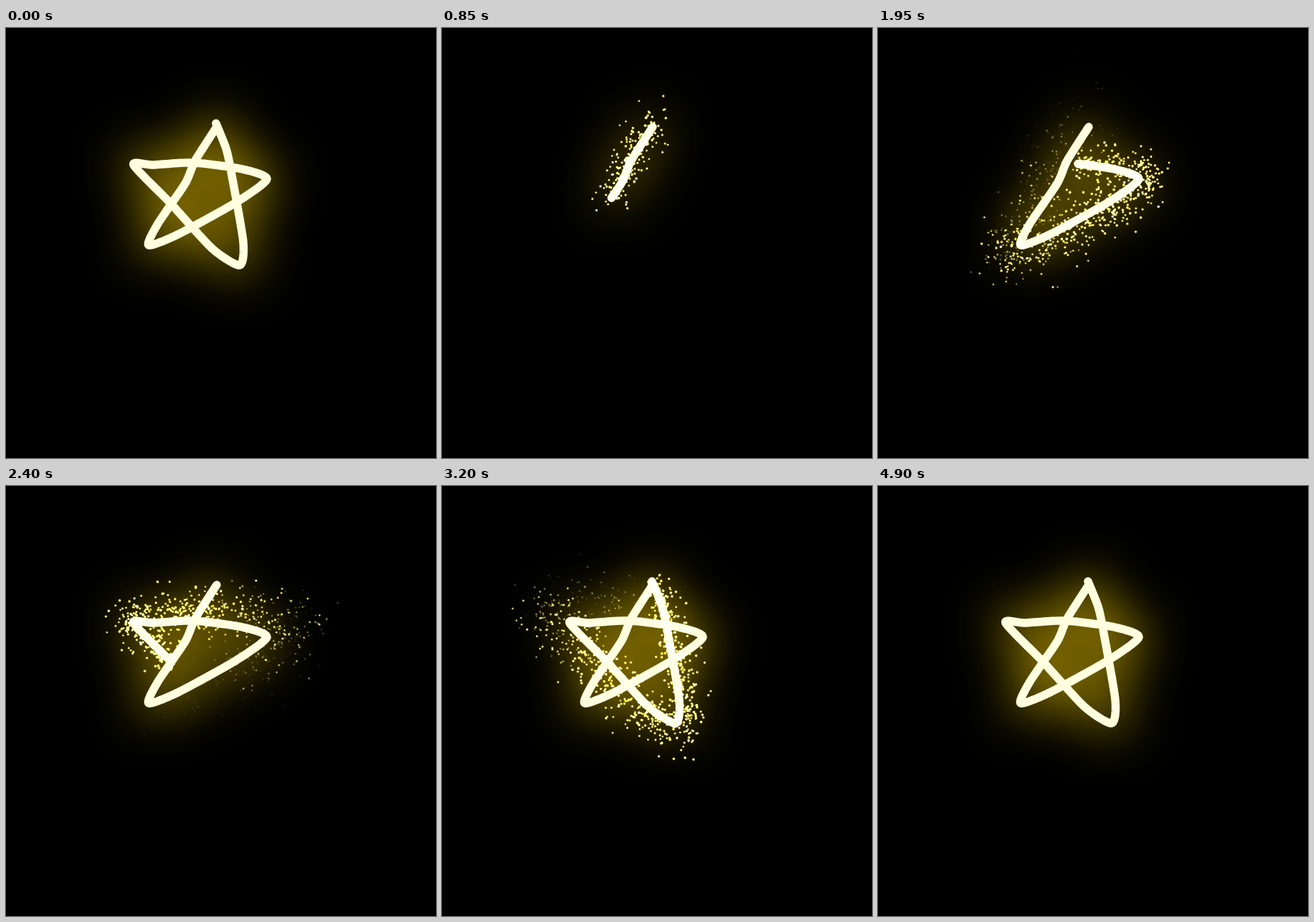
These frames come from a looping animation (600x600 px, 5150 ms). An HTML page with a canvas:

```html
<!DOCTYPE html>
<html lang="en">
<head>
<meta charset="utf-8">
<title>Sparkling star</title>
<style>
  html, body { margin: 0; width: 100%; height: 100%; overflow: hidden; background: #000; }
  canvas { display: block; width: 100vw; height: 100vh; }
</style>
</head>
<body>
<canvas id="stage" width="600" height="600"></canvas>
<script>
const ctx = document.getElementById('stage').getContext('2d');
const SIZE = 600, LOOP = 5150, TICK = 50, SPARKS = 1900;
const CENTER = { x: 270, y: 235 };

// Corners and main bends of the hand-drawn star
const bends = [
  [294,138],[264,185],[250,217],[212,273],[199,303],[240,288],[320,244],[364,211],[330,197],[262,188],
  [205,191],[178,191],[230,245],[288,308],[326,331],[331,298],[314,200],[307,168],[293,133]
];

// The picture moves one step per tick within these spans (ms)
const spans = [
  [400,500],[750,850],[1050,1500],[1600,1700],[1950,2450],[2500,2550],
  [2750,2950],[3200,3250],[3450,3950],[4000,4200],[4400,4450],[4750,4900]
];

// Smooth curve through the bends, each point with its distance along the line
function makeLine() {
  const tension = 0.35, detail = 16, last = bends.length - 1, line = [];
  const slope = (i, k) =>
    tension * (bends[Math.min(i + 1, last)][k] - bends[Math.max(i - 1, 0)][k]);
  let prev = null;
  for (let n = 0; n <= last * detail; n++) {
    const i = Math.min(Math.floor(n / detail), last - 1), t = n / detail - i;
    const ease = t * t * (3 - 2 * t);
    const [x, y] = [0, 1].map(k =>
      bends[i][k] + (bends[i + 1][k] - bends[i][k]) * ease +
      slope(i, k) * t * (1 - t) ** 2 - slope(i + 1, k) * t * t * (1 - t));
    const d = prev ? prev.d + Math.hypot(x - prev.x, y - prev.y) : 0;
    line.push(prev = { x, y, d });
  }
  return line;
}
const line = makeLine();
const LENGTH = line[line.length - 1].d;

// Pen keys: step, distance drawn
const pen = [[0, 0], [3, 22], [13, 332], [29, 652], [38, LENGTH]];

function interpolate(keys, v, from, to) {
  const i = Math.max(1, keys.findIndex(key => key[from] >= v));
  const a = keys[i - 1], b = keys[i];
  return a[to] + (b[to] - a[to]) * (v - a[from]) / (b[from] - a[from]);
}
const drawnAt = step => step >= 38 ? LENGTH : interpolate(pen, step, 0, 1);
const birthAt = distance => interpolate(pen, distance, 1, 0);

function pointAt(distance) {
  const i = Math.max(1, line.findIndex(p => p.d >= distance));
  const a = line[i - 1], b = line[i], t = (distance - a.d) / (b.d - a.d);
  return { x: a.x + (b.x - a.x) * t, y: a.y + (b.y - a.y) * t };
}

function seeded(seed) {
  return () => {
    seed = (seed + 0x6D2B79F5) | 0;
    let t = Math.imul(seed ^ (seed >>> 15), 1 | seed);
    t = (t + Math.imul(t ^ (t >>> 7), 61 | t)) ^ t;
    return ((t ^ (t >>> 14)) >>> 0) / 4294967296;
  };
}

const random = seeded(71);
const sparks = Array.from({ length: SPARKS }, () => {
  const distance = random() * LENGTH, angle = random() * Math.PI * 2;
  return {
    ...pointAt(distance),
    birth: birthAt(distance),
    dx: Math.cos(angle), dy: Math.sin(angle),
    scatter: 4 + 30 * random() ** 2.5,
    speed: 3 * random() ** 1.7,
    drift: 0.022 + 0.022 * random(),
    life: 14 + 6 * random(),
    size: 0.75 + 0.5 * random()
  };
});

function stepAt(ms) {
  const now = ms < TICK ? LOOP : ms;
  return spans.reduce((step, [start, end]) =>
    now < start ? step : step + Math.floor((Math.min(now, end) - start) / TICK) + 1, 0);
}

function strokeStar(drawn, width, shift = 0) {
  const tip = pointAt(drawn);
  ctx.lineWidth = width;
  ctx.beginPath();
  for (const p of line) {
    if (p.d >= drawn) break;
    ctx.lineTo(p.x + shift, p.y);
  }
  ctx.lineTo(tip.x + shift, tip.y);
  ctx.stroke();
}

// Only the shadow of the shifted line lands on the stage
function drawGlow(drawn) {
  const shift = 2000;
  ctx.save();
  ctx.shadowColor = 'gold';
  ctx.shadowBlur = 72;
  ctx.shadowOffsetX = shift;
  strokeStar(drawn, 15.5, -shift);
  ctx.restore();
}

function dot(x, y, radius, color, alpha) {
  ctx.globalAlpha = alpha;
  ctx.fillStyle = color;
  ctx.beginPath();
  ctx.arc(x, y, radius, 0, Math.PI * 2);
  ctx.fill();
}

function drawSparks(step) {
  ctx.save();
  ctx.globalCompositeOperation = 'lighter';
  for (const s of sparks) {
    const age = step - s.birth;
    if (age < 0 || age >= s.life) continue;
    const spread = s.scatter + s.speed * age;
    const x = s.x + s.dx * spread + (s.x - CENTER.x) * s.drift * age;
    const y = s.y + s.dy * spread + (s.y - CENTER.y) * s.drift * age;
    const alpha = Math.min(1, (s.life - age) / 8);
    dot(x, y, s.size + 0.8, '#ffe640', 0.5 * alpha * alpha);
    dot(x, y, s.size * (0.7 + 0.3 * alpha), '#ffffc8', alpha);
  }
  ctx.restore();
}

function draw(step) {
  ctx.fillStyle = '#000';
  ctx.fillRect(0, 0, SIZE, SIZE);
  if (!step) return;
  const drawn = drawnAt(step);
  ctx.lineCap = ctx.lineJoin = 'round';
  ctx.strokeStyle = '#ffffe0';
  drawGlow(drawn);
  strokeStar(drawn, 11.5);
  drawSparks(step);
}

let shown = -1;
function frame() {
  const step = stepAt(performance.now() % LOOP);
  if (step !== shown) draw(shown = step);
  requestAnimationFrame(frame);
}
frame();
</script>
</body>
</html>
```
